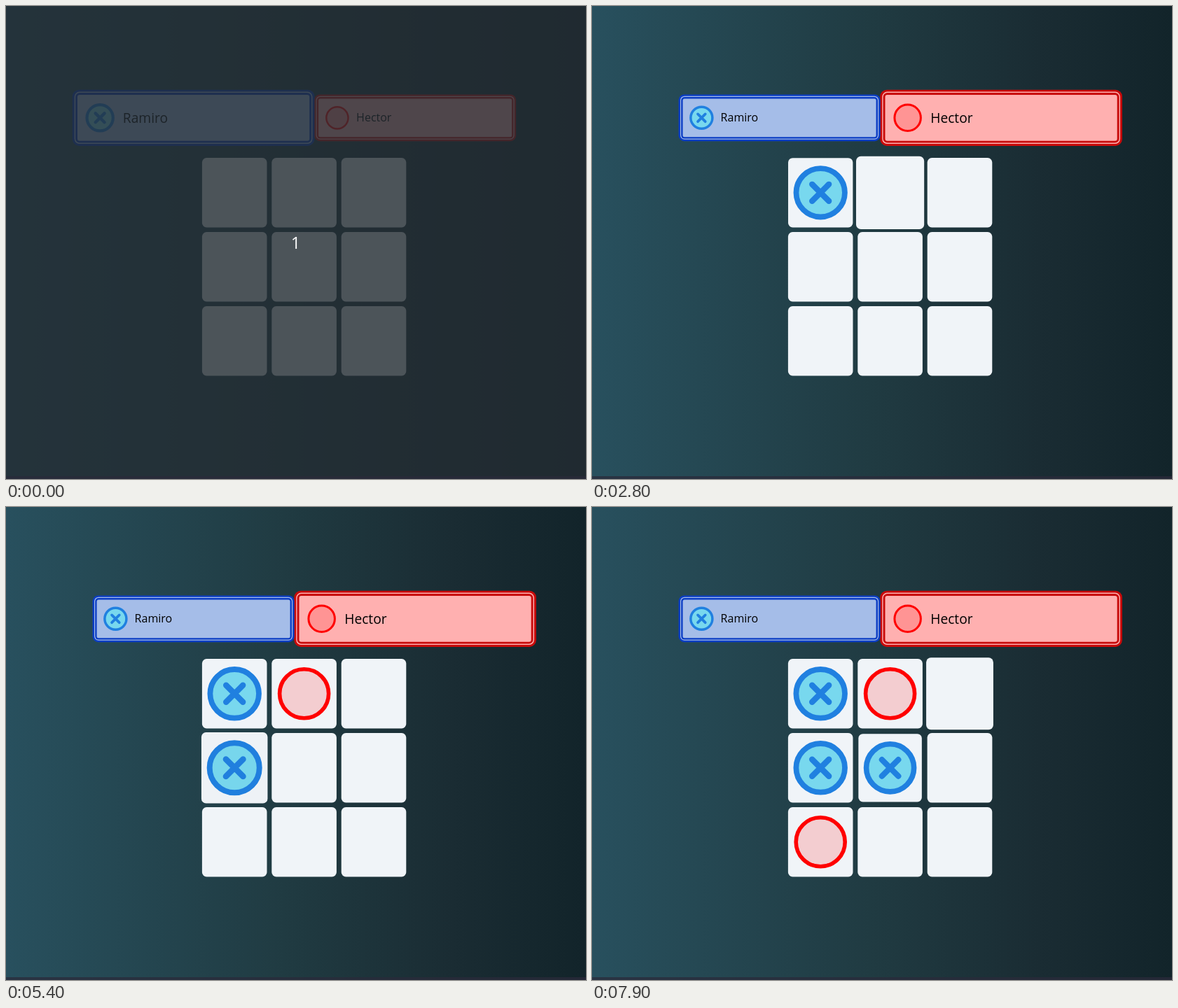
These frames come from a looping animation (828 px wide and 676 px high, 8 s). An HTML page:

```html
<!DOCTYPE html>
<html lang="en">
<head>
<meta charset="utf-8">
<title>Tic-tac-toe</title>
<style>
  html, body { margin: 0; width: 100%; height: 100%; overflow: hidden; background: #203b42; }
  svg { display: block; width: 828px; height: 676px; }
  text { font-family: "Open Sans", "Noto Sans", sans-serif; }
</style>
</head>
<body>
<svg viewBox="0 0 828 676">
  <defs>
    <linearGradient id="night">
      <stop offset="0" stop-color="#28505e"/>
      <stop offset=".12" stop-color="#264b57"/>
      <stop offset=".48" stop-color="#203b42"/>
      <stop offset=".77" stop-color="#1a2c33"/>
      <stop offset="1" stop-color="#12242a"/>
    </linearGradient>
    <g id="cross">
      <circle r="34.8" fill="#78d8ee" stroke="#2080e0" stroke-width="7.8"/>
      <path d="M-12-12 12 12M12-12-12 12" stroke="#2080e0" stroke-width="8.4" stroke-linecap="round"/>
    </g>
    <circle id="ring" r="35" fill="#f00" fill-opacity=".16" stroke="#f00" stroke-width="5.6"/>
  </defs>
  <rect width="828" height="676" fill="url(#night)"/>
  <g id="cards"></g>
  <g id="board"></g>
  <g id="countdown">
    <rect width="828" height="676" fill="#242c32" fill-opacity=".8"/>
    <text x="413.5" y="347" font-size="24" fill="#fff" text-anchor="middle">1</text>
  </g>
  <rect y="672" width="828" height="4" fill="#2a2a3a" fill-opacity=".75"/>
</svg>
<script>
const LOOP = 8000, STEP = 100;
const COUNTDOWN_END = 100;
const HOVER_TIME = 280, HOVER_GROWTH = .05;
const BOUNCE_TIME = 1000, TURN_TIME = 400;

// Crosses and rings alternate, crosses first.
const moves = [
  { tile: 0, at: 1885 },
  { tile: 1, at: 3375 },
  { tile: 3, at: 4880 },
  { tile: 6, at: 6155 },
  { tile: 4, at: 7200 }
];
const hovers = [
  { tile: 0, from: 1288, to: 2400 },
  { tile: 1, from: 2560, to: 3900 },
  { tile: 4, from: 4290, to: 4410 },
  { tile: 3, from: 4410, to: 5400 },
  { tile: 6, from: 5830, to: 6700 },
  { tile: 4, from: 6900, to: 7640 },
  { tile: 5, from: 7690, to: 7785 },
  { tile: 2, from: 7785, to: LOOP }
];
const bounceScales = [.3, 1.1, .9, 1.03, .97, 1];

function cubicBezier(x1, y1, x2, y2) {
  const curve = (a, b, u) => 3 * a * u * (1 - u) ** 2 + 3 * b * u * u * (1 - u) + u ** 3;
  return x => {
    if (x <= 0) return 0;
    if (x >= 1) return 1;
    let low = 0, high = 1;
    for (let i = 0; i < 24; i++) {
      const mid = (low + high) / 2;
      if (curve(x1, x2, mid) < x) low = mid; else high = mid;
    }
    return curve(y1, y2, low);
  };
}
const ease = cubicBezier(.25, .1, .25, 1);
const easeOut = cubicBezier(.215, .61, .355, 1);

function add(parent, name, attributes = {}) {
  const node = document.createElementNS("http://www.w3.org/2000/svg", name);
  for (const key in attributes) node.setAttribute(key, attributes[key]);
  return parent.appendChild(node);
}

function place(node, x, y, scale) {
  node.setAttribute("transform", `translate(${x} ${y}) scale(${scale})`);
}

const cardLayer = document.getElementById("cards");
const board = document.getElementById("board");
const countdown = document.getElementById("countdown");

function makeCard(x, name, piece, line, fill) {
  const group = add(cardLayer, "g");
  const layer = (inset, radius, color) => add(group, "rect", {
    x: inset - 144, y: inset - 33.4, width: 288 - 2 * inset, height: 66.8 - 2 * inset, rx: radius, fill: color
  });
  layer(0, 8, line);
  layer(2.4, 6, fill);
  layer(3.6, 5, line);
  layer(6, 2.5, fill);
  add(group, "use", { href: piece, transform: "translate(-111.2 0) scale(.446)" });
  add(group, "text", { x: -84, y: 5.6, "font-size": 16 }).textContent = name;
  return { group, x };
}
const ringCard = makeCard(584.1, "Hector", "#ring", "#c80a0a", "#ffb0b0");
const crossCard = makeCard(267.6, "Ramiro", "#cross", "#0b3dc4", "#a5bde8");

const tiles = Array.from({ length: 9 }, (_, i) => {
  const group = add(board, "g");
  add(group, "rect", { x: -46.3, y: -49.7, width: 92.6, height: 99.4, rx: 6.5, fill: "#f0f4f8" });
  const turn = moves.findIndex(move => move.tile === i);
  const piece = turn < 0 ? null : add(group, "use", { href: turn % 2 ? "#ring" : "#cross" });
  return { group, piece, move: moves[turn], x: 326.2 + i % 3 * 99.4, y: 266.8 + Math.floor(i / 3) * 106 };
});

function hoverAmount(tile, t) {
  let amount = 0;
  for (const { from, to } of hovers.filter(hover => hover.tile === tile)) {
    if (t < from) continue;
    const grown = ease((Math.min(t, to) - from) / HOVER_TIME);
    amount = t < to ? grown : grown * (1 - ease((t - to) / (HOVER_TIME * grown)));
  }
  return amount;
}

function bounce(progress) {
  const position = progress * (bounceScales.length - 1);
  const i = Math.floor(position);
  const start = bounceScales[i], end = bounceScales[i + 1];
  return {
    scale: start + (end - start) * easeOut(position - i),
    opacity: easeOut(progress / .6)
  };
}

function drawTile({ group, piece, move, x, y }, i, t) {
  const age = move ? t - move.at : -1;
  const bouncing = age >= 0 && age < BOUNCE_TIME;
  const pose = bouncing ? bounce(age / BOUNCE_TIME)
    : { scale: 1 + HOVER_GROWTH * hoverAmount(i, t), opacity: 1 };
  place(group, x, y, pose.scale);
  group.setAttribute("opacity", pose.opacity);
  if (piece) piece.setAttribute("visibility", age >= 0 ? "visible" : "hidden");
}

function drawCards(t) {
  const played = moves.filter(move => move.at <= t);
  const change = played.length ? ease((t - played.at(-1).at) / TURN_TIME) : 1;
  const ringTurn = played.length % 2 ? change : 1 - change;
  place(crossCard.group, crossCard.x, 159.8, 1.2 - .2 * ringTurn);
  place(ringCard.group, ringCard.x, 159.8, 1 + .2 * ringTurn);
}

const begin = performance.now();
function frame() {
  // The small lead absorbs display timing jitter around each step.
  const elapsed = (performance.now() - begin + 20) % LOOP;
  const t = Math.floor(elapsed / STEP) * STEP;
  drawCards(t);
  tiles.forEach((tile, i) => drawTile(tile, i, t));
  countdown.setAttribute("visibility", t < COUNTDOWN_END ? "visible" : "hidden");
  requestAnimationFrame(frame);
}
frame();
</script>
</body>
</html>
```
